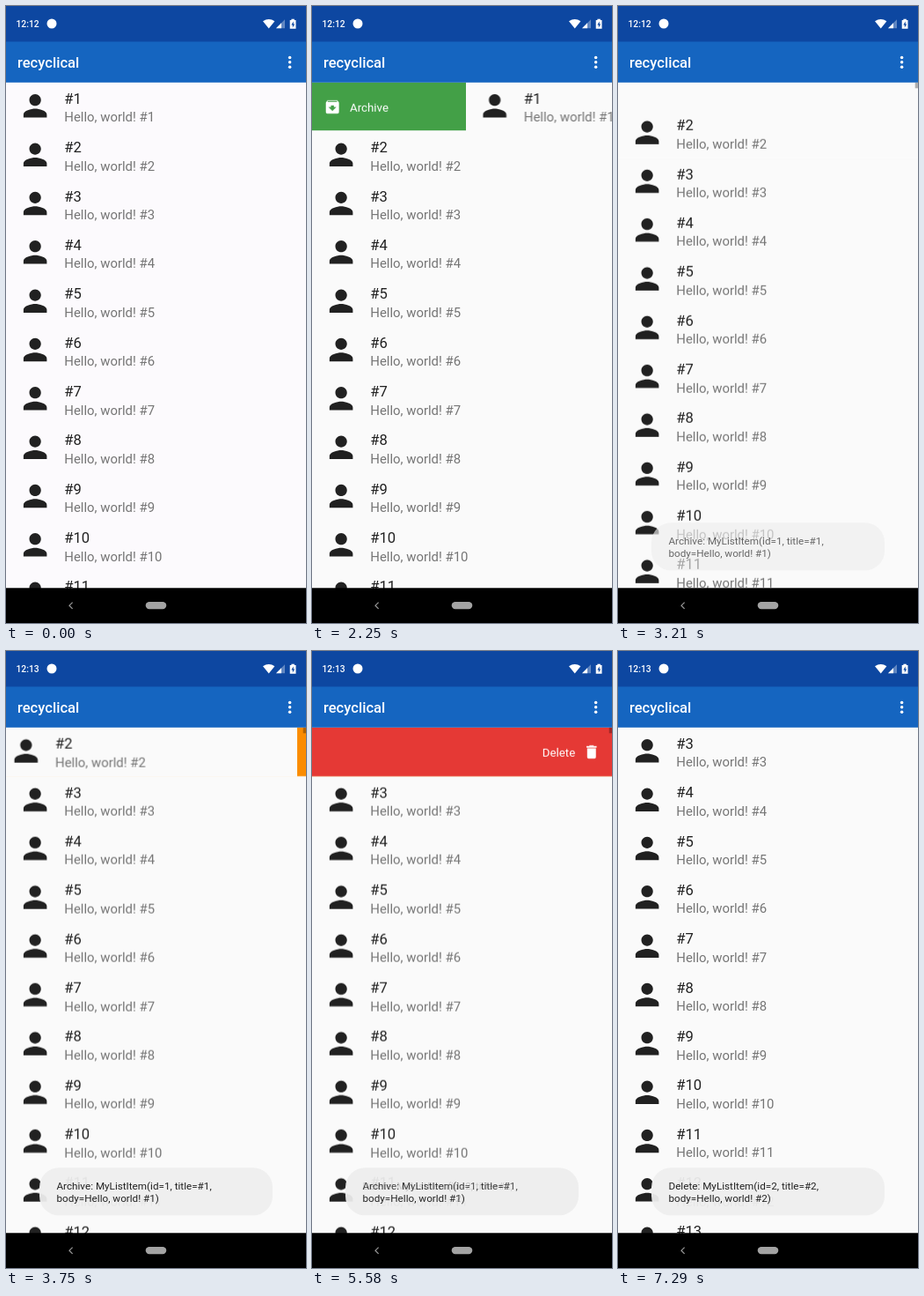
These frames come from a looping animation (341 px wide and 700 px high, 7.33 s). An HTML page:

```html
<!DOCTYPE html>
<html lang="en">
<head>
<meta charset="utf-8">
<title>recyclical</title>
<style>
html, body { margin: 0; width: 100%; height: 100%; overflow: hidden; background: #000; }
svg { display: block; width: 341px; height: 700px; font-family: Roboto, sans-serif; }

/* Everything shares one 7330 ms loop. */
.paper, #list, .slide, .action, .face, .clock, .toast, .thumb {
  animation: 7330ms linear infinite;
}
.paper { fill: #fafafa; animation-name: paper; animation-timing-function: step-end; }
.person, .title { fill: #212121; }
.title { font-size: 16.58px; }
.body { font-size: 14.92px; fill: #757575; }
.face text { font-size: 13.3px; }
.face text, .face path { fill: #fff; }
.end { text-anchor: end; }

#list { animation-name: shift; }
.right .slide { animation-name: swipe-right; }
.left .slide { animation-name: swipe-left; }
.action, .face, .clock { animation-timing-function: step-end; }
.right .action { animation-name: right-action; }
.left .action { animation-name: left-action; }
.right .long { animation-name: right-long; }
.left .long { animation-name: left-long; }
.clock { font-size: 10.3px; font-weight: 500; }
.before { animation-name: before; }
.after { animation-name: after; }
.thumb { animation-name: thumb; }
.toast text { font-size: 11.7px; fill: #222; }
.archived { animation-name: archived; }
.deleted { animation-name: deleted; }

@keyframes paper { 0% { fill: #fcfafd } 13.097%, 100% { fill: #fafafa } }
@keyframes shift {
  0%, 42.196% { transform: translateY(0); animation-timing-function: cubic-bezier(.37, 0, .63, 1) }
  45.607% { transform: translateY(-55.34px) }
  76.671% { transform: translateY(-55.34px); animation-timing-function: cubic-bezier(.37, 0, .63, 1) }
  80.082%, 100% { transform: translateY(-110.68px) }
}
@keyframes swipe-right {
  0%, 13.097% { transform: translateX(0) }
  19.372% { transform: translateX(76.8px) }
  30.696% { transform: translateX(174.4px) }
  37.176% { transform: translateX(232px); animation-timing-function: cubic-bezier(.37, 0, .63, 1) }
  40.587%, 100% { transform: translateX(342px) }
}
@keyframes swipe-left {
  0%, 50.068% { transform: translateX(0) }
  60.846% { transform: translateX(-100.7px) }
  71.623% { transform: translateX(-208px); animation-timing-function: cubic-bezier(.37, 0, .63, 1) }
  75.034%, 100% { transform: translateX(-342px) }
}
@keyframes right-action { 0% { opacity: 0 } 13.097% { opacity: 1 } 42.196%, 100% { opacity: 0 } }
@keyframes left-action { 0% { opacity: 0 } 50.068% { opacity: 1 } 76.671%, 100% { opacity: 0 } }
@keyframes right-long { 0% { opacity: 0 } 30.191%, 100% { opacity: 1 } }
@keyframes left-long { 0% { opacity: 0 } 67.845%, 100% { opacity: 1 } }
@keyframes before { 0% { opacity: 1 } 50.068%, 100% { opacity: 0 } }
@keyframes after { 0% { opacity: 0 } 50.068%, 100% { opacity: 1 } }
@keyframes thumb {
  0%, 40.92% { opacity: 0; height: 6.5px }
  40.93%, 76.66% { opacity: 1; height: 6.5px }
  76.67%, 96.453% { opacity: 1; height: 3.5px }
  99.591%, 100% { opacity: 0; height: 3.5px }
}
@keyframes archived {
  0%, 41.542% { opacity: 0; animation-timing-function: cubic-bezier(.25, .46, .45, .94) }
  46.999% { opacity: 1 }
  75.648% { opacity: 1; animation-timing-function: cubic-bezier(.55, .085, .68, .53) }
  80.355%, 100% { opacity: 0 }
}
@keyframes deleted {
  0%, 75.648% { opacity: 0; animation-timing-function: cubic-bezier(.25, .46, .45, .94) }
  80.355%, 100% { opacity: 1 }
}
</style>
</head>
<body>
<svg viewBox="0 0 341 700">
  <defs>
    <path id="person" d="M12 12c2.21 0 4-1.79 4-4s-1.79-4-4-4-4 1.79-4 4 1.79 4 4 4zm0 2c-2.67 0-8 1.34-8 4v2h16v-2c0-2.66-5.33-4-8-4z"/>
  </defs>

  <rect class="paper" y="80" width="341" height="581"/>
  <g id="list"></g>
  <rect class="thumb" x="337.7" y="86.8" width="3.3" height="6.5" fill="#000" fill-opacity=".3"/>
  <g id="toasts"></g>

  <rect width="341" height="86.79" fill="#1565c0"/>
  <rect width="341" height="40.44" fill="#0d47a1"/>
  <g fill="#fff">
    <text class="clock before" x="11.5" y="24">12:12</text>
    <text class="clock after" x="11.5" y="24">12:13</text>
    <circle cx="52" cy="20" r="5.5"/>
    <path d="M298.7 25.5L292 17.2Q298.7 12.8 305.4 17.2z"/>
    <path d="M307 25.3h10V15.3z" opacity=".35"/>
    <path d="M307 25.3h6v-6z"/>
    <path d="M324.4 14.7h3.4v1.3h1.7v9.8h-6.8V16h1.7z"/>
    <path d="M326.7 17.5l-2.4 4h1.5v3l2.4-4h-1.5z" fill="#0d47a1"/>
    <text x="13" y="69.8" font-size="16.58" font-weight="500">recyclical</text>
    <circle cx="322.6" cy="58.4" r="1.75"/>
    <circle cx="322.6" cy="63.8" r="1.75"/>
    <circle cx="322.6" cy="69.2" r="1.75"/>
  </g>

  <rect y="660.27" width="341" height="40"/>
  <path d="M75.6 676.6l-3.6 3.6 3.6 3.6" fill="none" stroke="#9a9a9a" stroke-width="1.2"/>
  <rect x="158.7" y="675.9" width="23.6" height="8.4" rx="4.2" fill="#a3a3a3"/>
</svg>
<script>
const TOP = 86.79;
const ROW = 55.34;

const icons = {
  mail: 'M20 4H4c-1.1 0-2 .9-2 2v12c0 1.1.9 2 2 2h16c1.1 0 2-.9 2-2V6c0-1.1-.9-2-2-2zm0 4l-8 5-8-5V6l8 5 8-5z',
  archive: 'M20.5 5.2l-1.4-1.7C18.9 3.2 18.5 3 18 3H6c-.5 0-.9.2-1.2.5L3.5 5.2C3.2 5.6 3 6 3 6.5V19c0 1.1.9 2 2 2h14c1.1 0 2-.9 2-2V6.5c0-.5-.2-.9-.5-1.3zM12 17.5L6.5 12H10v-2h4v2h3.5zM5.1 5l.8-1h12l.9 1z',
  star: 'M12 17.27L18.18 21l-1.64-7.03L22 9.24l-7.19-.61L12 2 9.19 8.63 2 9.24l5.46 4.73L5.82 21z',
  bin: 'M6 19c0 1.1.9 2 2 2h8c1.1 0 2-.9 2-2V7H6zM19 4h-3.5l-1-1h-5l-1 1H5v2h14z'
};

const swipes = {
  1: { side: 'right', faces: [['Unread', 'mail', '#1e88e5'], ['Archive', 'archive', '#43a047']] },
  2: { side: 'left', faces: [['Star', 'star', '#fb8c00'], ['Delete', 'bin', '#e53935']] }
};

const face = (side, [label, icon, color], i) => {
  const atEnd = side === 'left';
  return `<g class="face ${i ? 'long' : 'short'}">
    <rect width="341" height="${ROW}" fill="${color}"/>
    <path d="${icons[icon]}" fill-rule="evenodd" transform="translate(${atEnd ? 307.8 : 13.26} 17.8) scale(.829)"/>
    <text x="${atEnd ? 299.2 : 43}" y="32.7" class="${atEnd ? 'end' : ''}">${label}</text>
  </g>`;
};

const content = n => `
  <use href="#person" class="person" transform="translate(13.26 6.62) scale(1.657)"/>
  <text class="title" x="66.3" y="24.2">#${n}</text>
  <text class="body" x="66.3" y="44.7">Hello, world! #${n}</text>`;

// A swipeable row slides an opaque cover off the action behind it.
const row = n => {
  const swipe = swipes[n];
  const inner = swipe
    ? `<g class="action">${swipe.faces.map((f, i) => face(swipe.side, f, i)).join('')}</g>
       <g class="slide"><rect class="paper" y="-1" width="341" height="${ROW + 2}"/>${content(n)}</g>`
    : content(n);
  return `<g class="${swipe ? swipe.side : ''}" transform="translate(0 ${TOP + (n - 1) * ROW})">${inner}</g>`;
};

const toast = (name, verb, n) => `<g class="toast ${name}">
  <rect x="38" y="586.3" width="265" height="54" rx="22" fill="#eee" fill-opacity=".94"/>
  <text x="57.5" y="611">${verb}: MyListItem(id=${n}, title=#${n},</text>
  <text x="57.5" y="624.6">body=Hello, world! #${n})</text>
</g>`;

document.getElementById('list').innerHTML =
  Array.from({ length: 13 }, (_, i) => row(i + 1)).join('');
document.getElementById('toasts').innerHTML =
  toast('archived', 'Archive', 1) + toast('deleted', 'Delete', 2);
</script>
</body>
</html>
```
